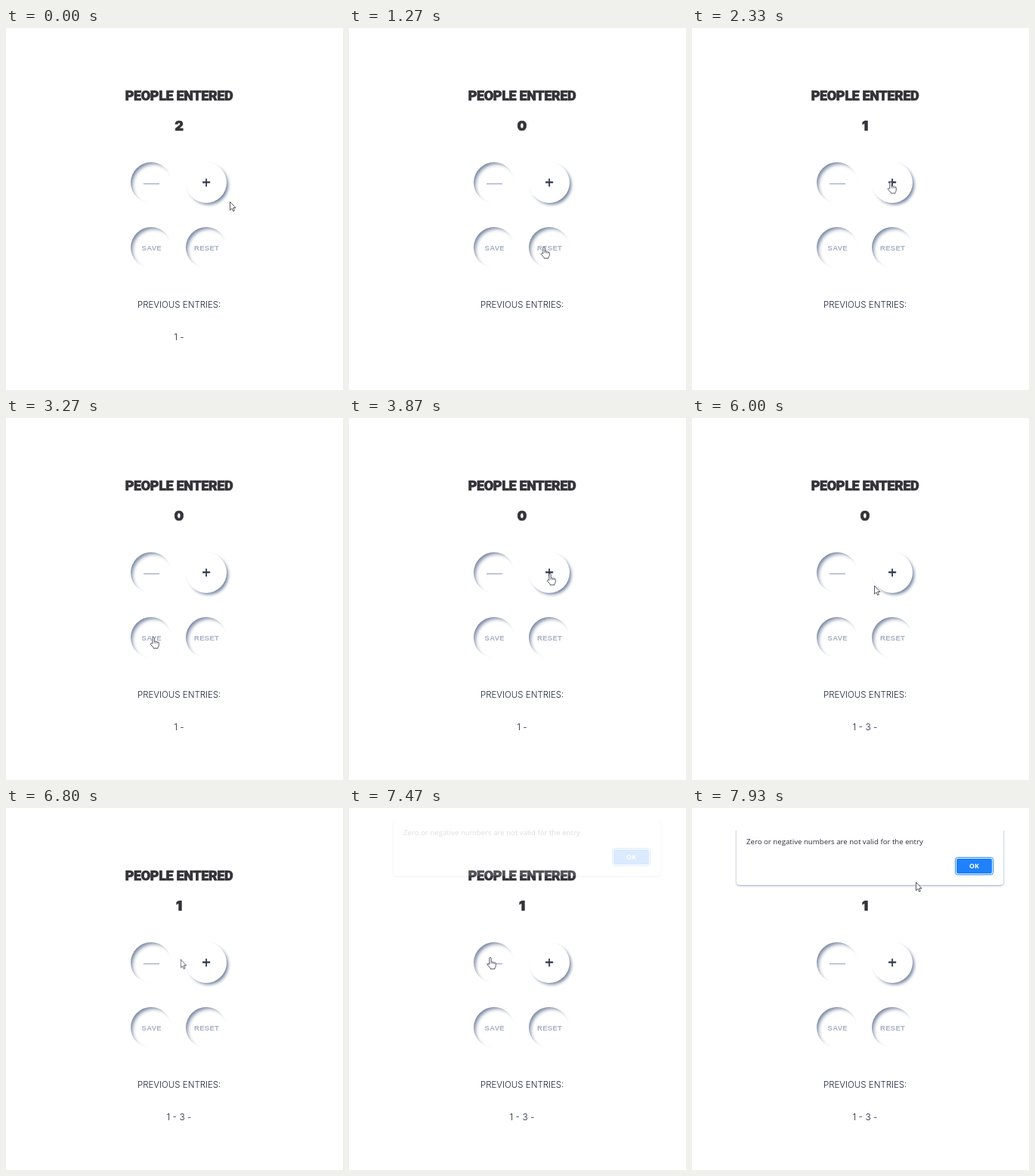
Recreate the animation shown at these times as an HTML page. Size 446x480 px, loop 8000 ms.

```html
<!DOCTYPE html>
<html lang="en">
<head>
<meta charset="utf-8">
<title>People counter</title>
<style>
  html, body { margin: 0; width: 100%; height: 100%; overflow: hidden; background: #fff; }
  .stage { position: relative; width: 446px; height: 480px; overflow: hidden; background: #fff; }
  .stage > svg, .dialog, .dialog svg { position: absolute; left: 0; top: 0; width: 446px; height: 480px; }

  /* The small negative delay keeps samples clear of the step edges. */
  .play { animation: 8s -4ms step-end infinite; }

  .button {
    position: absolute; width: 54px; height: 54px; border-radius: 50%;
    box-shadow: inset 4px 4px 5px -2px #75839d;
  }
  .button.raised { box-shadow: 3px 3px 4px -1px #72819c; }

  text { text-anchor: middle; }
  .title { font: 900 18px Roboto, sans-serif; letter-spacing: -.36px; fill: #333338; stroke: #333338; stroke-width: .7px; }
  .count { font: 900 18px Inter, sans-serif; fill: #333338; stroke: #333338; stroke-width: .6px; }
  .label { font: bold 9.5px "Liberation Sans", Arial, sans-serif; letter-spacing: .3px; fill: #a5afc3; }
  .minus { font: 21px "Liberation Sans", Arial, sans-serif; fill: #a5afc3; }
  .plus { font: 20px "Liberation Sans", Arial, sans-serif; fill: #2c3248; stroke: #2c3248; stroke-width: .5px; }
  .heading { font: 300 11.5px Inter, sans-serif; fill: #1c2436; }
  .entries { font: 300 12px Inter, sans-serif; fill: #1c2436; }

  .digits { animation-name: digits; }
  @keyframes digits {
    0%, 54.17% { transform: translateY(-80px); }
    10.83%, 40.83%, 71.67% { transform: translateY(0); }
    27.5%, 51.67%, 82.5%, 100% { transform: translateY(-40px); }
    56.67% { transform: translateY(-120px); }
  }

  .rows { animation-name: rows; }
  @keyframes rows {
    0%, 40.83% { transform: translateY(-40px); }
    10.83% { transform: translateY(0); }
    71.67%, 100% { transform: translateY(-80px); }
  }

  .dialog { clip-path: inset(12px 0 0); }
  .sheet { position: absolute; inset: 0; opacity: 0; animation-name: sheet; }
  @keyframes sheet {
    0% { opacity: 0; transform: translateY(-12px); }
    93.33% { opacity: .16; transform: translateY(-12px); clip-path: inset(30px 0 0); }
    94.17% { opacity: .55; transform: translateY(-5px); }
    95% { opacity: .87; transform: translateY(-2px); }
    95.83%, 100% { opacity: 1; transform: none; }
  }
  .panel {
    position: absolute; left: 59px; top: 27px; width: 353px; height: 75px;
    background: #fff; border-radius: 0 0 4px 4px;
    box-shadow: 0 1px 3px rgba(96, 120, 160, .65);
    clip-path: inset(0 -8px -8px);
  }
  .dialog text { font: 9.67px "Open Sans", sans-serif; fill: #2b2f38; text-anchor: start; }
  .dialog .says { font-size: 11.2px; }
  .dialog .ok { font-size: 8.8px; font-weight: 700; fill: #fff; text-anchor: middle; }

  .cursor { position: absolute; left: 0; top: 0; animation-name: move; }
  .cursor svg { position: absolute; left: -5px; top: -1px; overflow: hidden; }
  .cursor path { fill: #fff; stroke: #444751; stroke-width: .9px; stroke-linejoin: round; }
  .cursor .crease { fill: none; stroke-width: .7px; }

  @keyframes move {
    0% { transform: translate(297px, 231px); animation-timing-function: steps(4); }
    3.333% { transform: translate(270px, 272px); animation-timing-function: steps(4); }
    6.667% { transform: translate(257px, 290px); }
    18.333% { transform: translate(257px, 290px); animation-timing-function: steps(3); }
    20.833% { transform: translate(275px, 238px); animation-timing-function: steps(2); }
    22.5% { transform: translate(277px, 206px); animation-timing-function: steps(2); }
    24.167% { transform: translate(270px, 190px); }
    28.333% { transform: translate(270px, 190px); animation-timing-function: steps(4); }
    31.667% { transform: translate(238px, 245px); animation-timing-function: steps(5); }
    35.833% { transform: translate(194px, 290px); }
    42.5% { transform: translate(194px, 290px); animation-timing-function: steps(3); }
    45% { transform: translate(232px, 240px); animation-timing-function: steps(4); }
    48.333% { transform: translate(265px, 206px); }
    60% { transform: translate(265px, 206px); }
    60.833% { transform: translate(251px, 222px); animation-timing-function: steps(5); }
    65% { transform: translate(214px, 260px); animation-timing-function: steps(5); }
    69.167% { transform: translate(192px, 292px); }
    71.667% { transform: translate(192px, 292px); animation-timing-function: steps(4); }
    75% { transform: translate(242px, 223px); animation-timing-function: steps(5); }
    79.167% { transform: translate(265px, 206px); }
    83.333% { transform: translate(265px, 206px); animation-timing-function: steps(3); }
    85.833% { transform: translate(215px, 199px); animation-timing-function: steps(3); }
    88.333% { transform: translate(186px, 198px); }
    93.333% { transform: translate(186px, 198px); animation-timing-function: steps(3); }
    95.833% { transform: translate(232px, 154px); animation-timing-function: steps(4); }
    99.167%, 100% { transform: translate(297px, 99px); }
  }

  /* Arrow between buttons, hand over them. */
  .shape { animation-name: shape; }
  @keyframes shape {
    0%, 20%, 30.83%, 44.17%, 61.67%, 73.33%, 85%, 94.17%, 100% { transform: none; }
    3.33%, 21.67%, 35%, 46.67%, 66.67%, 75.83%, 85.83% { transform: translateX(-40px); }
  }
</style>
</head>
<body>
<div class="stage">
  <div class="button" style="left:165px; top:178px"></div>
  <div class="button raised" style="left:238px; top:178px"></div>
  <div class="button" style="left:165px; top:264px"></div>
  <div class="button" style="left:238px; top:264px"></div>

  <svg viewBox="0 0 446 480">
    <text class="title" x="229" y="96">PEOPLE ENTERED</text>
    <svg x="209" y="116" width="40" height="30">
      <g class="count digits play">
        <text x="20" y="20">0</text>
        <text x="20" y="60">1</text>
        <text x="20" y="100">2</text>
        <text x="20" y="140">3</text>
      </g>
    </svg>
    <text class="minus" x="192.5" y="211.5">—</text>
    <text class="plus" x="265.2" y="212">+</text>
    <text class="label" x="192.8" y="295.2">SAVE</text>
    <text class="label" x="265.6" y="295.2">RESET</text>
    <text class="heading" x="229.2" y="371">PREVIOUS ENTRIES:</text>
    <svg x="189" y="395" width="80" height="30">
      <g class="entries rows play">
        <text x="40" y="58.5">1 -</text>
        <text x="40" y="98.5">1 - 3 -</text>
      </g>
    </svg>
  </svg>

  <div class="dialog">
    <div class="sheet play">
      <div class="panel"></div>
      <svg viewBox="0 0 446 480">
        <text class="says" x="72" y="26">This page says</text>
        <text x="72" y="48.4">Zero or negative numbers are not valid for the entry</text>
        <rect x="348.5" y="65.5" width="50" height="23" rx="3" fill="#fff" stroke="#2a86f8"/>
        <rect x="350" y="67" width="47" height="20" rx="2" fill="#1f82fb"/>
        <text class="ok" x="373.3" y="80.2">OK</text>
      </svg>
    </div>
  </div>

  <div class="cursor play">
    <svg width="20" height="20">
      <g class="shape play">
        <path d="M4.5 .5v11l2.5-2.3 1.7 3.8 1.7-.8-1.7-3.7h3.3z"/>
        <g transform="translate(40.8 .7)">
          <path d="M4 9.6V1.8a1.2 1.2 0 0 1 2.4 0V6.6q1.2-1 2.2.3 1.2-.8 2 .4 1.8-.4 1.9 1.2V11q0 2-1.3 3.6v1H5.3v-1L1.6 10.6q-.5-1.4.9-1.6z"/>
          <path class="crease" d="M6.4 6.6V9M8.6 6.9v2.2M10.6 7.3v1.9"/>
        </g>
      </g>
    </svg>
  </div>
</div>
</body>
</html>
```
